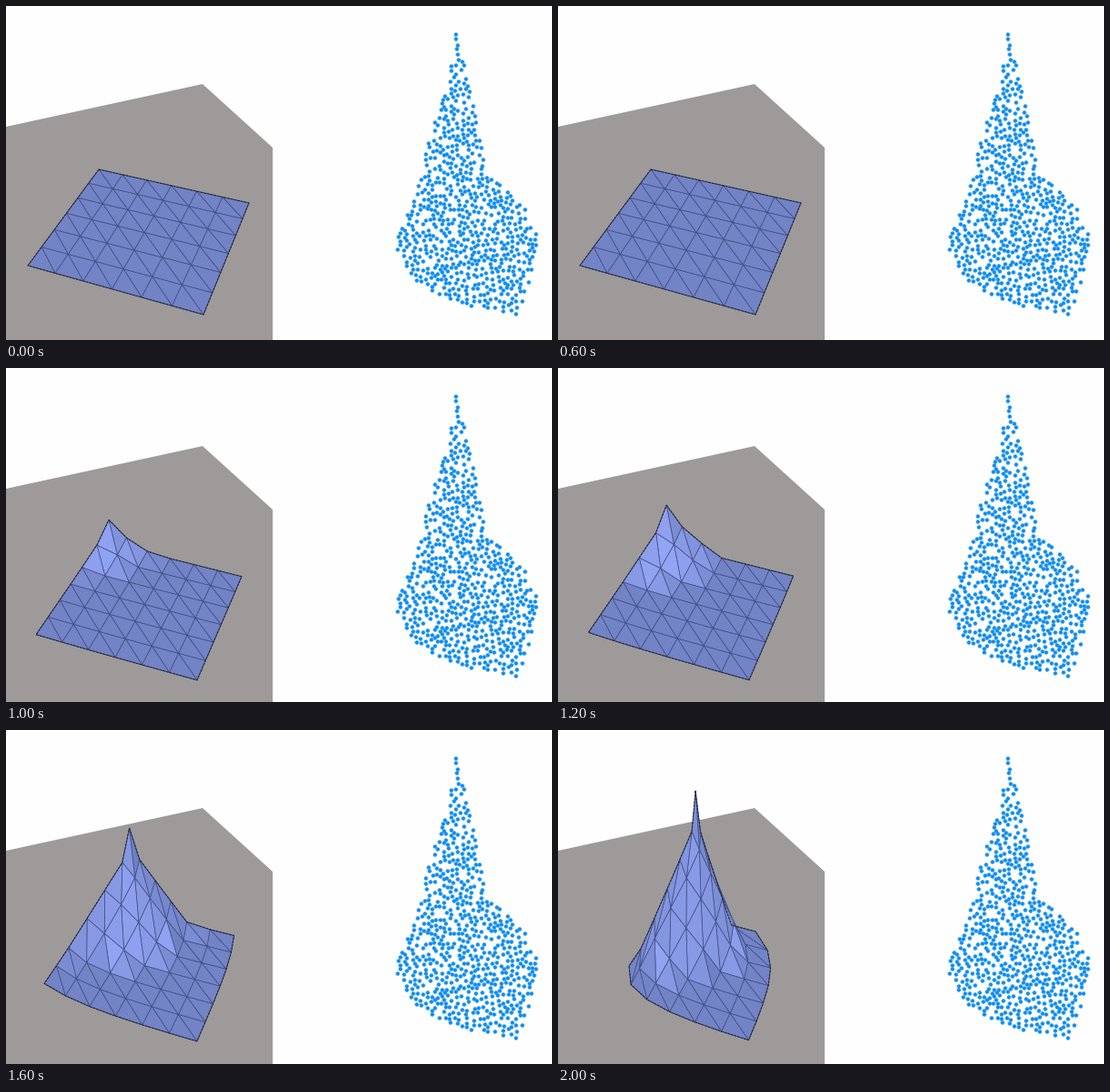
These frames come from a looping animation (600 px wide and 368 px high, 2100 ms). A matplotlib script:

```python
import numpy as np
import matplotlib.pyplot as plt
from matplotlib.animation import FuncAnimation
from matplotlib.collections import PolyCollection
from matplotlib.patches import Polygon
from matplotlib.path import Path

W, H, DPI, FRAMES = 600, 368, 100, 21
PX = 72 / DPI
N = 6  # cells per side of the sheet
FREE, PULL, END = 6, 8, 20  # sheet lets go, corner is pulled, loop ends
BASE = np.array([114, 131, 198]) / 255
LIT = np.array([146, 164, 244]) / 255
LIGHT = np.array([0.34, 0.49, 0.80])
LIGHT /= np.linalg.norm(LIGHT)

ROW, COL = np.mgrid[0:N + 1, 0:N + 1]
DIST = np.hypot(ROW, COL)  # distance from the pulled corner, in cells
TURN = np.arctan2(ROW, COL) / (np.pi / 2)  # 0 on the top edge, 1 on the left


def plane(a, b, c, d):
    """Perspective grid of a square with corners a, b, c, d."""
    a, b, c, d = (np.array(p, float) for p in (a, b, c, d))
    g, h = np.linalg.solve(np.column_stack([b - c, d - c]), a - b + c - d)
    u, v = COL[..., None] / N, ROW[..., None] / N
    top = a + u * (b * (1 + g) - a) + v * (d * (1 + h) - a)
    return top / (1 + g * u + h * v)


FLOAT = plane((102, 180), (267, 217), (217, 340), (24, 286))
REST = plane((104, 191), (259, 230), (210, 344), (33, 295))

# height of the pulled corner in pixels
HEIGHT = np.poly1d(np.polyfit([8, 12, 16, 20], [14, 40, 83, 124], 3))
TOP = HEIGHT(END)


def pulled(h):
    """Screen grid and lift of the sheet with its corner raised by h."""
    drag = (h / TOP) ** 4
    right = (1 - TURN) ** 6
    drift = np.dstack([drag * (45 * TURN ** 8 - 42 * right),
                       -np.sqrt(drag) * (35 * TURN ** 4 + 8 * right)])
    neck = (h - 10) * np.dstack([0.24 + 0.23 * TURN, -0.75 - 0.08 * TURN])
    foot = 0.45 * np.sqrt(h)
    w = np.clip((foot - DIST) / (foot - 1), 0, 1)
    move = drift + (neck - drift) * w[..., None]
    move[0, 0] = 0.38 * h, -h
    lift = -neck[..., 1] * w
    lift[0, 0] = h
    return REST + move, lift


def sheet(f):
    if f >= PULL:
        return pulled(HEIGHT(f))
    grid, lift = pulled(HEIGHT(PULL))
    t = max(0, f - FREE) / (PULL - FREE)
    return FLOAT + (grid - FLOAT) * t, lift * t


def triangles():
    """Corner indices (row, column) of each triangle, far cells last."""
    cells = [(j, i) for j in range(N) for i in range(N)]
    for j, i in sorted(cells, key=max, reverse=True):
        yield (j, i), (j, i + 1), (j + 1, i + 1)
        yield (j, i), (j + 1, i), (j + 1, i + 1)


TJ, TI = np.moveaxis(np.array(list(triangles())), -1, 0)


def shade(lift):
    pts = np.dstack([TI, TJ, lift[TJ, TI] / 15])
    n = np.cross(pts[:, 1] - pts[:, 0], pts[:, 2] - pts[:, 0])
    n *= np.sign(n[:, 2:])
    n /= np.linalg.norm(n, axis=1, keepdims=True)
    glow = np.clip((n @ LIGHT - LIGHT[2]) / (1 - LIGHT[2]), -0.1, 1)
    return BASE + glow[:, None] * (LIT - BASE)


def cloud(count=640, gap=3.9):
    """Loosely spaced random dots inside the bell-shaped outline."""
    bell = Path([(493, 30), (502, 62), (520, 140), (526, 182), (548, 201),
                 (572, 224), (584, 258), (576, 300), (562, 340), (510, 331),
                 (470, 316), (447, 300), (427, 262), (447, 215), (458, 178),
                 (464, 146), (487, 85)])
    rng = np.random.default_rng(4)
    spots = rng.uniform((427, 30), (584, 340), (9000, 2))
    dots = np.array([(494, 31), (494, 36), (495, 47), (560, 339)], float)
    for q in spots[bell.contains_points(spots)]:
        if len(dots) < count and np.hypot(*(dots - q).T).min() > gap:
            dots = np.vstack([dots, q])
    return dots


fig = plt.figure(figsize=(W / DPI, H / DPI), dpi=DPI, facecolor="#fefefe")
ax = fig.add_axes([0, 0, 1, 1])
ax.set(xlim=(0, W), ylim=(H, 0))
ax.axis("off")

ax.add_patch(Polygon([(0, 133), (216, 86), (293, 156), (293, H), (0, H)],
                     fc="#9d9a99", ec="none"))
ax.scatter(*cloud().T, s=(4.4 * PX) ** 2, c="#118ef0", lw=0)

mesh = PolyCollection([], edgecolors="#3f4d84", linewidths=0.7 * PX,
                      joinstyle="round", zorder=3)
ax.add_collection(mesh)
rim, = ax.plot([], [], color="#1c1f2c", lw=PX, zorder=4,
               ls=(0, (3, 0.8)), dash_capstyle="butt")


def draw(f):
    grid, lift = sheet(f)
    mesh.set_verts(grid[TJ, TI])
    mesh.set_facecolor(shade(lift))
    edge = np.concatenate([grid[0], grid[1:, N], grid[N, -2::-1],
                           grid[-2::-1, 0]])
    rim.set_data(*edge.T)
    return mesh, rim


anim = FuncAnimation(fig, draw, frames=FRAMES, interval=100, repeat=True,
                     repeat_delay=0)
plt.show()
```
